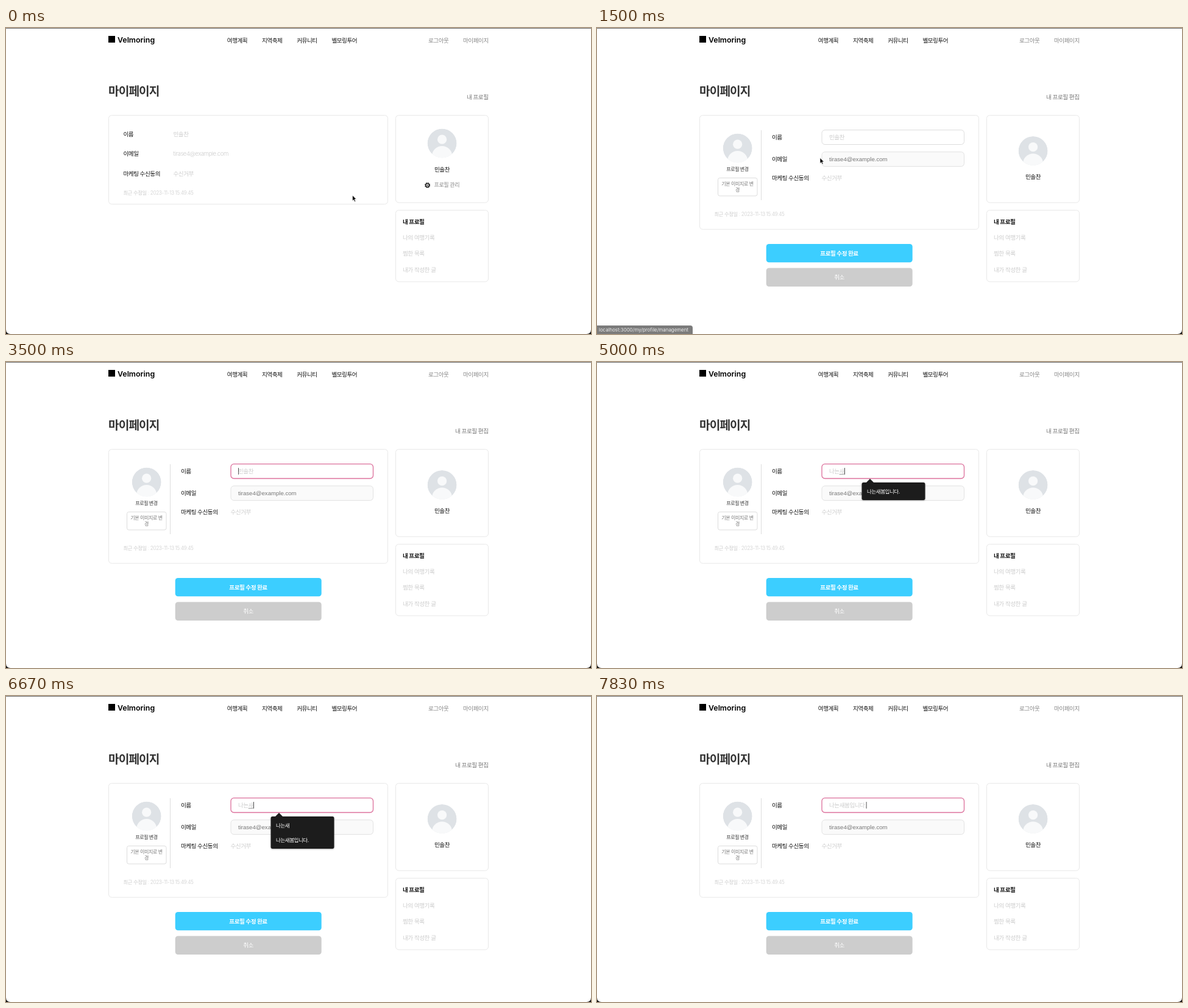
Recreate the animation shown at these times as an HTML page. Size 960 px wide and 503 px high, loop 8000 ms.

```html
<!DOCTYPE html>
<html lang="ko">
<head>
<meta charset="utf-8">
<title>마이페이지</title>
<style>
html, body { margin: 0; width: 100%; height: 100%; overflow: hidden; background: #fff; }
svg { display: block; width: 100%; height: 100%; }
text { font-family: Inter, "Noto Sans CJK KR", sans-serif; letter-spacing: -.05em; white-space: pre; }
.plain { letter-spacing: 0; }
.arial { font-family: "Liberation Sans", Arial, sans-serif; letter-spacing: 0; }
</style>
</head>
<body>
<svg id="stage" viewBox="0 0 960 503" xmlns="http://www.w3.org/2000/svg"></svg>
<script>
const LOOP = 8000, STEP = 1000 / 6;
const NAME = '민솔찬', MAIL = 'tirase4@example.com', PHRASE = '나는새봄입니다.';
const INK = '#111', GREY = '#888', PALE = '#ccc';
const FIELD_X = 381, SYLLABLE = 8.35;

// y is the vertical middle of the line
const text = (x, y, s, { fill = INK, size = 9.6, weight = 400, anchor = 'start', cls = '', id = '' } = {}) =>
  `<text x="${x}" y="${y + size * 0.37}" fill="${fill}" font-size="${size}" font-weight="${weight}"` +
  ` text-anchor="${anchor}" class="${cls}" id="${id}">${s}</text>`;

const box = (x, y, w, h, r, fill, stroke = 'none', id = '') =>
  `<rect id="${id}" x="${x}" y="${y}" width="${w}" height="${h}" rx="${r}" fill="${fill}" stroke="${stroke}"/>`;

const card = (x, y, w, h) => box(x, y, w, h, 5, '#fff', '#e8e8e8');
const label = (x, y, s) => text(x, y, s, { weight: 500 });
const faint = (x, y, s) => text(x, y, s, { fill: PALE, weight: 300 });
const mid = (x, y, s, o) => text(x, y, s, { anchor: 'middle', ...o });
const stamp = y => text(192.5, y, '최근 수정일 : 2023-11-13 15:49:45', { fill: PALE, size: 8.4, weight: 300 });

const avatar = (x, y) => `<g transform="translate(${x} ${y})" clip-path="url(#round)">
  <circle r="24" fill="#dee2e6"/><circle cy="-6.3" r="7.6" fill="#f8f9fa"/>
  <ellipse cy="20.5" rx="16.5" ry="16" fill="#f8f9fa"/></g>`;

const gear = `<g transform="translate(691.6 258.5)" fill="none" stroke="#222">
  <circle r="3.9" stroke-width="1.3" stroke-dasharray="1.7 1.363"/>
  <circle r="2.9" stroke-width="1.5"/><circle r="1.1" fill="#222" stroke="none"/></g>`;

const frame = `
  ${box(168, 13, 11, 11, 0, '#000')}
  ${text(183, 19, 'Velmoring', { size: 12.4, weight: 600, cls: 'plain', fill: '#000' })}
  ${['여행계획', '지역축제', '커뮤니티', '벨모링투어'].map((s, i) => label(362.8 + i * 57.2, 20.5, s)).join('')}
  ${text(693, 20.5, '로그아웃', { fill: GREY })}
  ${text(750, 20.5, '마이페이지', { fill: GREY })}
  ${text(168, 103.5, '마이페이지', { size: 19.2, weight: 700, fill: '#333' })}
  ${card(639.5, 143.5, 152, 143.5)}
  ${card(639.5, 299.5, 152, 117.5)}
  ${text(651, 318, '내 프로필', { weight: 600 })}
  ${['나의 여행기록', '찜한 목록', '내가 작성한 글'].map((s, i) => faint(651, 344.5 + i * 26.4, s)).join('')}`;

const view = `<g id="view">
  ${text(791.5, 113.5, '내 프로필', { fill: '#777', anchor: 'end' })}
  ${card(168.5, 143.5, 458, 146)}
  ${label(192.5, 174, '이름')}${faint(274.5, 174, NAME)}
  ${label(192.5, 206.5, '이메일')}${faint(274.5, 206.5, MAIL)}
  ${label(192.5, 239, '마케팅 수신동의')}${faint(274.5, 239, '수신거부')}
  ${stamp(270.5)}
  ${avatar(715.6, 189.5)}
  ${mid(715.5, 232, NAME, { weight: 500 })}
  ${gear}${text(702.5, 258, '프로필 관리', { fill: GREY, size: 9.1 })}
</g>`;

const edit = `<g id="edit">
  ${text(791.5, 113.5, '내 프로필 편집', { fill: '#777', anchor: 'end' })}
  ${card(168.5, 143.5, 458, 187.5)}
  ${avatar(230.7, 197.5)}
  ${mid(230.5, 232.5, '프로필 변경', { size: 8, weight: 500, fill: '#333' })}
  ${box(198.5, 246.5, 64.5, 29.5, 3, '#fff', '#ddd')}
  ${mid(230.5, 256, '기본 이미지로 변', { size: 8, fill: '#777' })}
  ${mid(230.5, 266, '경', { size: 8, fill: '#777' })}
  <path d="M269.5 168V283" stroke="#ddd"/>
  ${label(287, 179.5, '이름')}${label(287, 215.5, '이메일')}${label(287, 246, '마케팅 수신동의')}
  ${faint(368.5, 246, '수신거부')}
  ${box(369, 167.7, 233.5, 23.8, 5, '#fff', '#ddd', 'field')}
  ${box(FIELD_X, 174, 26, 11, 0, '#b4d5fe', 'none', 'mark')}
  ${text(FIELD_X, 179.5, NAME, { fill: PALE, weight: 300, id: 'typed' })}
  ${box(0, 184, 8, 1, 0, '#999', 'none', 'under')}
  ${box(0, 174, 0.9, 11, 0, '#444', 'none', 'caret')}
  ${box(369, 203.7, 233.5, 23.8, 5, '#fafafa', '#e2e2e2')}
  ${text(FIELD_X, 215.5, MAIL, { fill: '#777', cls: 'arial' })}
  ${stamp(305.5)}
  ${box(277.7, 355, 240, 30.3, 4.5, '#3cceff')}
  ${mid(397.5, 370, '프로필 수정 완료', { fill: '#fff', weight: 600 })}
  ${box(277.7, 394.5, 240, 30.5, 4.5, '#cdcdcd')}
  ${mid(397.5, 409.3, '취소', { fill: '#fff', weight: 500 })}
  ${avatar(715.6, 202)}
  ${mid(715.5, 244.5, NAME, { weight: 500 })}
</g>`;

const popup = `<g id="popup" filter="url(#shade)">
  <path d="M441.5 198.5L448 192L454.5 198.5Z" fill="#1f1f1f"/>
  ${box(434.5, 198, 104, 53, 3, '#1f1f1f', 'none', 'panel')}
  ${text(443, 212.5, '', { fill: '#fff', size: 8.5, id: 'row1' })}
  ${text(443, 236.7, PHRASE, { fill: '#fff', size: 8.5, id: 'row2' })}
</g>`;

const chrome = `
  <rect width="960" height="1" fill="#6a6a6a"/>
  <path d="M0 495.5Q0 503 7.5 503H0ZM960 495.5Q960 503 952.5 503H960Z" fill="#111"/>
  <g id="status"><path d="M0 489H153Q157 489 157 493V503H0Z" fill="#7b7b7b"/>
  ${text(3, 496.2, 'localhost:3000/my/profile/management', { fill: '#eee', size: 7.87, cls: 'plain' })}</g>`;

const pointers = `
  <path id="arrow" d="M0 0V9.2L2.1 7.2L3.6 10.6L5.2 9.9L3.7 6.6H6.5Z" fill="#000" stroke="#fff" stroke-width=".7"/>
  <path id="hand" d="M-1.1 6V.9Q-1.1 0 -.2 0T.8 .9V3.8Q1.8 3.2 2.5 4.1Q3.5 3.6 4.2 4.6Q5.8 4.3 5.8 5.8Q5.8 8 4.7 9.6V11.2H-.4V10Q-2.2 8.4 -3.3 6.4Q-3.5 5.2 -2.3 5.2Z"
    fill="#fff" stroke="#222" stroke-width=".9" stroke-linejoin="round"/>
  <path id="beam" d="M-2 -5.3Q0 -5.3 0 -4V4Q0 5.3 -2 5.3M2 -5.3Q0 -5.3 0 -4V4Q0 5.3 2 5.3" fill="none" stroke="#222" stroke-width=".9"/>`;

const stage = document.getElementById('stage');
stage.innerHTML = `<defs>
  <clipPath id="round"><circle r="24"/></clipPath>
  <filter id="shade" x="-10%" y="-10%" width="120%" height="130%">
    <feDropShadow dx="0" dy="1" stdDeviation="1" flood-opacity=".3"/></filter></defs>
  <rect width="960" height="503" fill="#fff"/>` + frame + view + edit + popup + chrome + pointers;

const $ = id => document.getElementById(id);
const show = (id, on) => $(id).setAttribute('display', on ? 'inline' : 'none');
const set = (id, attrs) => { for (const k in attrs) $(id).setAttribute(k, attrs[k]); };
const last = (list, k) => list.filter(e => e[0] <= k).pop();

// step, pointer, x, y
const path = [
  [0, 'arrow', 568.5, 275], [1, 'arrow', 578, 275], [2, 'arrow', 622, 271], [3, 'arrow', 676, 264],
  [4, 'hand', 712, 255], [5, 'hand', 722, 253.5], [6, 'hand', 724.6, 253], [7, 'arrow', 724.6, 253],
  [8, 'arrow', 560, 236], [9, 'arrow', 366, 213.5], [10, 'arrow', 356, 203], [11, 'arrow', 362, 192],
  [12, 'beam', 396, 182], [13, 'beam', 424, 180], [14, 'beam', 433, 179.5], [15, 'beam', 398, 179.5],
  [16, 'arrow', 334, 174], [17, 'beam', 384, 179.5], [18, 'beam', 411, 179.5], [21, '']
];

// step, field text, suggestions, composing
const typing = [
  [23, 'ㄴ', 0, 1], [24, '나', 0, 1], [25, '난', 0, 1], [26, '나누', 0, 1], [27, '나눈', 0, 1],
  [30, '나는새', 1, 1], [31, '나는새ㅂ', 1, 1], [33, '나는', 2, 1], [34, '나', 0, 1],
  [35, '난', 0, 1], [36, '나느', 0, 1], [38, '나는', 2, 1], [39, '나는ㅅ', 0, 1],
  [40, '나는새', 2, 1], [41, '나는샙', 0, 1], [42, '나는새보', 0, 1], [43, '나는새봄', 1, 1],
  [44, '나는새봄입', 1, 1], [45, '나는새봄입니', 1, 1], [46, '나는새봄입니다', 1, 1], [47, PHRASE, 0, 0]
];

function draw(ms) {
  const k = Math.floor((ms + 4) / STEP);
  const editing = k >= 7, focused = k >= 13;
  show('view', !editing);
  show('edit', editing);
  show('status', k >= 5 && k < 11);

  const [, kind, x, y] = last(path, k);
  for (const id of ['arrow', 'hand', 'beam']) show(id, id === kind);
  if (kind) set(kind, { transform: `translate(${x} ${y})` });

  set('field', focused ? { stroke: '#dc6f9b', 'stroke-width': 1.3 } : { stroke: '#ddd', 'stroke-width': 1 });
  const selected = k >= 16 && k < 21;
  show('mark', selected || k === 15);
  set('mark', { x: k === 15 ? 398 : FIELD_X, width: k === 15 ? 9 : 26 });

  const [, value, rows, composing] = last(typing, k) || [0, '', 0, 0];
  const typed = $('typed');
  typed.textContent = value || NAME;
  const end = FIELD_X + (value ? typed.getComputedTextLength() : 0);
  show('caret', k >= 21);
  set('caret', { x: end });
  show('under', composing);
  set('under', { x: end - SYLLABLE });

  show('popup', rows);
  set('panel', { height: rows === 2 ? 53 : 29 });
  $('row1').textContent = rows === 2 ? '나는새' : PHRASE;
  show('row2', rows === 2);
}

function tick() {
  draw(performance.now() % LOOP);
  requestAnimationFrame(tick);
}
tick();
</script>
</body>
</html>
```
